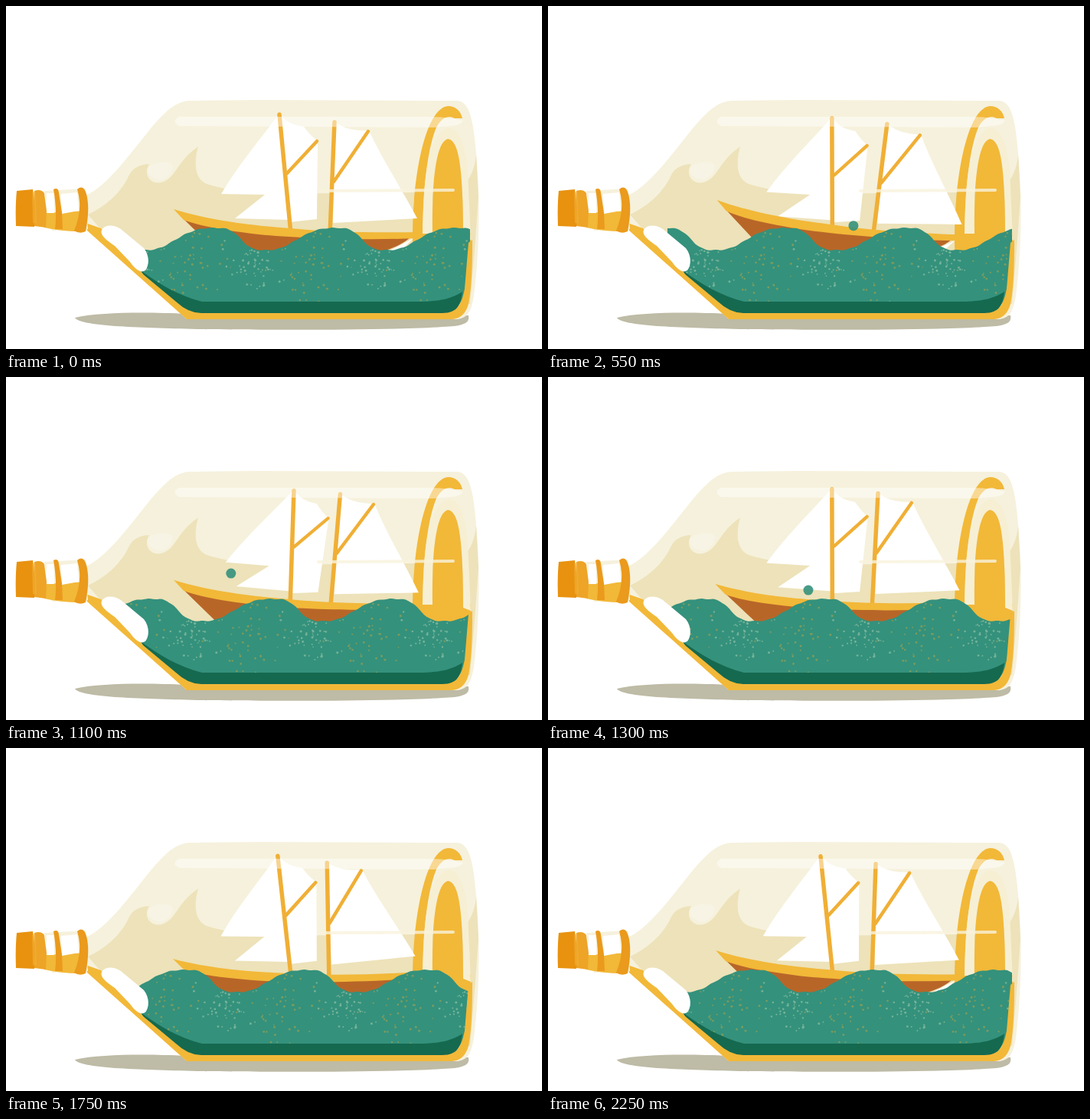
Write an HTML page that moves like this. It is 700 by 449 pixels and loops after 2300 ms.

```html
<!DOCTYPE html>
<html lang="en">
<head>
<meta charset="utf-8">
<title>Ship in a bottle</title>
<style>
  html, body { margin: 0; width: 100%; height: 100%; overflow: hidden; background: #fff; }
  svg { display: block; width: 100%; height: 100%; }
  .gold { fill: #f2b838; }
  .rod { fill: none; stroke: #f0af35; stroke-linecap: round; }
  .sail { fill: #fff; }
</style>
</head>
<body>
<svg viewBox="0 0 700 449" xmlns="http://www.w3.org/2000/svg">
  <defs>
    <clipPath id="inside">
      <path d="M156 270H606V308L599 375Q594 394 582 398H245L178 350L156 318Z"/>
    </clipPath>
  </defs>

  <path fill="#bebba6" d="M90 408C125 400 190 401 235 403L604 405C606 415 598 419 570 420C500 425 320 424 250 423C170 421 96 419 90 408Z"/>

  <!-- glass -->
  <path fill="#f6f1dc" d="M104 248C132 236 160 196 190 159C210 136 222 125 240 124L330 123L590 124C606 126 611 150 615 205C620 270 617 330 611 380C607 402 602 408 590 410H236L106 290Z"/>
  <path fill="#ede2b9" d="M107 273C130 262 150 245 160 223C165 212 175 207 187 207C178 222 190 234 203 231C222 226 222 204 251 184C245 205 246 226 262 233C290 242 320 244 345 246L540 244L597 235C607 226 613 210 614 194L617 250L613 306L606 390L240 398L120 288Z"/>
  <path fill="#f7f4e5" d="M187 210C195 203 214 202 218 209C217 221 206 231 198 227C187 224 182 216 187 210Z"/>

  <!-- bottle base -->
  <path class="gold" d="M531 297C532 215 549 134 577 131C588 131 594 138 596 147L586 147C577 143 569 146 562 159C550 188 545 240 544 297H607V340H531Z"/>
  <path fill="#f6efd3" d="M544 298C545 240 548 172 576 160C590 157 600 180 603 215L607 306L597 302C597 215 592 180 577 174C563 180 556 230 557 298Z"/>
  <path class="gold" d="M557 298C556 240 560 178 577 174C592 175 597 215 597 302L607 308V335H557Z"/>

  <!-- ship -->
  <g id="fore">
    <path class="sail" d="M356 142C334 172 304 207 281 246L338 247L299 278L371 280Z"/>
    <path class="sail" d="M357 140C364 152 376 156 389 158Q396 168 407 177L406 279L370 283Z"/>
    <path class="rod" stroke-width="5.5" d="M357 142L372 298"/>
    <path class="rod" stroke-width="4.5" d="M406 177L367 219"/>
  </g>
  <g id="aft">
    <path class="sail" d="M429 151C436 157 448 164 474 163C492 202 516 238 537 278L427 284Z"/>
    <path class="rod" stroke-width="5.5" d="M429 152L423 300"/>
    <path class="rod" stroke-width="4.5" d="M473 164L428 230"/>
  </g>
  <g id="hull">
    <path fill="#fff" d="M532 304L500 321L518 318Z"/>
    <path fill="#b86628" d="M230 277L276 322C340 336 440 332 492 321Q514 315 528 303L371 298Q290 292 230 277Z"/>
    <path class="gold" d="M219 266C270 282 330 288 371 291C420 296 480 297 540 296L536 304C470 307 380 304 330 299C290 294 255 289 232 280Z"/>
  </g>
  <g id="drops" fill="#34917c" opacity=".9"></g>

  <!-- water -->
  <g clip-path="url(#inside)">
    <path id="sea" fill="#34917c"/>
    <g id="foam" opacity=".55"></g>
  </g>
  <path fill="#15694f" d="M177 347C200 364 225 379 256 387H545C570 386 584 382 596 374C594 392 588 402 574 403H240L180 356Z"/>
  <path class="gold" d="M104 284L124 291L180 352L222 387Q238 402 255 402H570C590 402 595 390 599 370L604 310L609 306C609 345 608 370 604 390Q599 409 582 410H236L106 294Z"/>
  <path fill="#fff" d="M125 293C130 286 140 286 150 292L180 317C188 327 187 340 182 346C176 350 169 345 162 335L142 314C132 307 122 300 125 293Z"/>

  <!-- reflections -->
  <path fill="#fff" opacity=".45" d="M226 145H550Q570 145 580 147L597 150Q593 157 580 157L560 159L226 157Q215 151 226 145Z"/>
  <path fill="none" stroke="#f9f3dc" stroke-width="4" stroke-linecap="round" opacity=".8" d="M408 242L584 241"/>

  <!-- neck and cork -->
  <path fill="#f6f1dc" d="M50 242L104 239L107 292L60 294Z"/>
  <path class="gold" d="M50 271L106 268L104 295Q75 296 50 290Z"/>
  <path fill="#fff" d="M53 245H63V271H53ZM72 246L93 244L95 268L73 272Z"/>
  <path fill="#ea9a1c" d="M62 240Q68 237 69 244L73 270L74 292H64Q67 268 62 240ZM93 240Q101 233 105 246Q110 265 104 295Q96 299 89 294Q101 266 93 240Z"/>
  <path fill="#eda427" d="M37 242Q46 239 50 245L53 268L52 290L37 288Z"/>
  <path fill="#e8920f" d="M14 242L35 240Q39 262 37 289L13 288Q12 262 14 242Z"/>
  <path fill="#f2b137" opacity=".6" d="M34 244L39 243L40 285L35 284Z"/>
</svg>
<script>
  const LOOP = 2300, STEP = 50, WAVE = 158, CREST = 431;
  const NS = 'http://www.w3.org/2000/svg';
  const $ = id => document.getElementById(id);

  // pose keys over one loop
  const TIMES = [0, 550, 900, 1300, 1550, 1950, 2250];
  const BOW = [0, -12, -5, 5, 13, 5, -1];
  const FORE = [0, 14, 22, 14, 6, -8, -1];
  const AFT = [0, 14, 12, 2, -6, -11, -1];

  // smooth curve through the keys that closes on itself
  function pose(keys, t) {
    const n = keys.length;
    const time = i => TIMES[(i + n) % n] + LOOP * Math.floor(i / n);
    const value = i => keys[(i + n) % n];
    const slope = i => (value(i + 1) - value(i - 1)) / (time(i + 1) - time(i - 1));
    let i = n - 1;
    while (TIMES[i] > t) i--;
    const span = time(i + 1) - time(i), p = (t - time(i)) / span, q = 1 - p;
    return value(i) * q * q * (1 + 2 * p) + value(i + 1) * p * p * (3 - 2 * p)
      + span * p * q * (slope(i) * q - slope(i + 1) * p);
  }

  function circle(parent, r, fill) {
    const c = document.createElementNS(NS, 'circle');
    c.setAttribute('r', r);
    if (fill) c.setAttribute('fill', fill);
    return parent.appendChild(c);
  }

  function place(el, x, y) {
    el.setAttribute('cx', x.toFixed(2));
    el.setAttribute('cy', y.toFixed(2));
  }

  let seed = 11;
  const random = () => (seed = seed * 16807 % 2147483647) / 2147483647;
  const spread = size => (random() + random() + random() - 1.5) * size;

  // flat crests and troughs, with the falling side in front
  function surface(x, shift) {
    const u = (x - CREST - shift) / WAVE * 2 * Math.PI;
    const v = u + 0.3 * (1 - Math.cos(u));
    return 305 - 16 * Math.cos(v) + 1.5 * Math.cos(3 * v) + 0.5 * Math.sin(9 * u);
  }

  const specks = [];
  for (let i = 0; i < 110; i++) {
    const pale = i % 2;
    const dx = (pale ? 52 : -33) + spread(pale ? 40 : 52);
    const y = (pale ? 338 : 345) + spread(pale ? 32 : 60);
    const r = 0.8 + random() * 0.8;
    for (let k = -3; k <= 1; k++) {
      specks.push({ x: CREST + k * WAVE + dx, y, el: circle($('foam'), r, pale ? '#a9cfb0' : '#b5a447') });
    }
  }

  const drops = [
    { from: 400, to: 1050, x: p => 345 + 111 * Math.pow(p * 1.3, 0.6), y: 309, rise: 30 },
    { from: 780, to: 1400, x: p => 220 + 143 * p, y: 305, rise: 48 }
  ];
  drops.forEach(d => d.el = circle($('drops'), 6.5));

  // lean a mast and its sails about a pivot, with some turn and dip
  function lean(el, k, x, y, turn, dip) {
    el.setAttribute('transform',
      `matrix(1 ${turn * k} ${-k} ${1 - dip * k} ${y * k} ${k * (dip * y - turn * x)})`);
  }

  function draw(t) {
    const shift = WAVE * t / LOOP;
    lean($('fore'), pose(FORE, t) / 151, 371, 291, 0.5, 0.4);
    lean($('aft'), pose(AFT, t) / 170, 424, 320, 0.8, 0.15);
    const tilt = -Math.atan(pose(BOW, t) / 250) * 180 / Math.PI;
    $('hull').setAttribute('transform', `rotate(${tilt} 470 296)`);

    let d = 'M150 410';
    for (let x = 150; x <= 612; x += 3) d += `L${x} ${surface(x, shift).toFixed(2)}`;
    $('sea').setAttribute('d', d + 'L612 410Z');

    for (const s of specks) {
      const x = s.x + shift;
      place(s.el, x, Math.max(s.y, surface(x, shift) + 3));
    }
    for (const o of drops) {
      const p = (t - o.from) / (o.to - o.from), on = p >= 0 && p <= 1;
      o.el.setAttribute('visibility', on ? 'visible' : 'hidden');
      if (on) place(o.el, o.x(p), o.y - o.rise * 4 * p * (1 - p));
    }
  }

  const start = performance.now();
  function tick() {
    const t = (performance.now() - start) % LOOP;
    draw(Math.floor(t / STEP) * STEP);
    requestAnimationFrame(tick);
  }
  tick();
</script>
</body>
</html>
```
